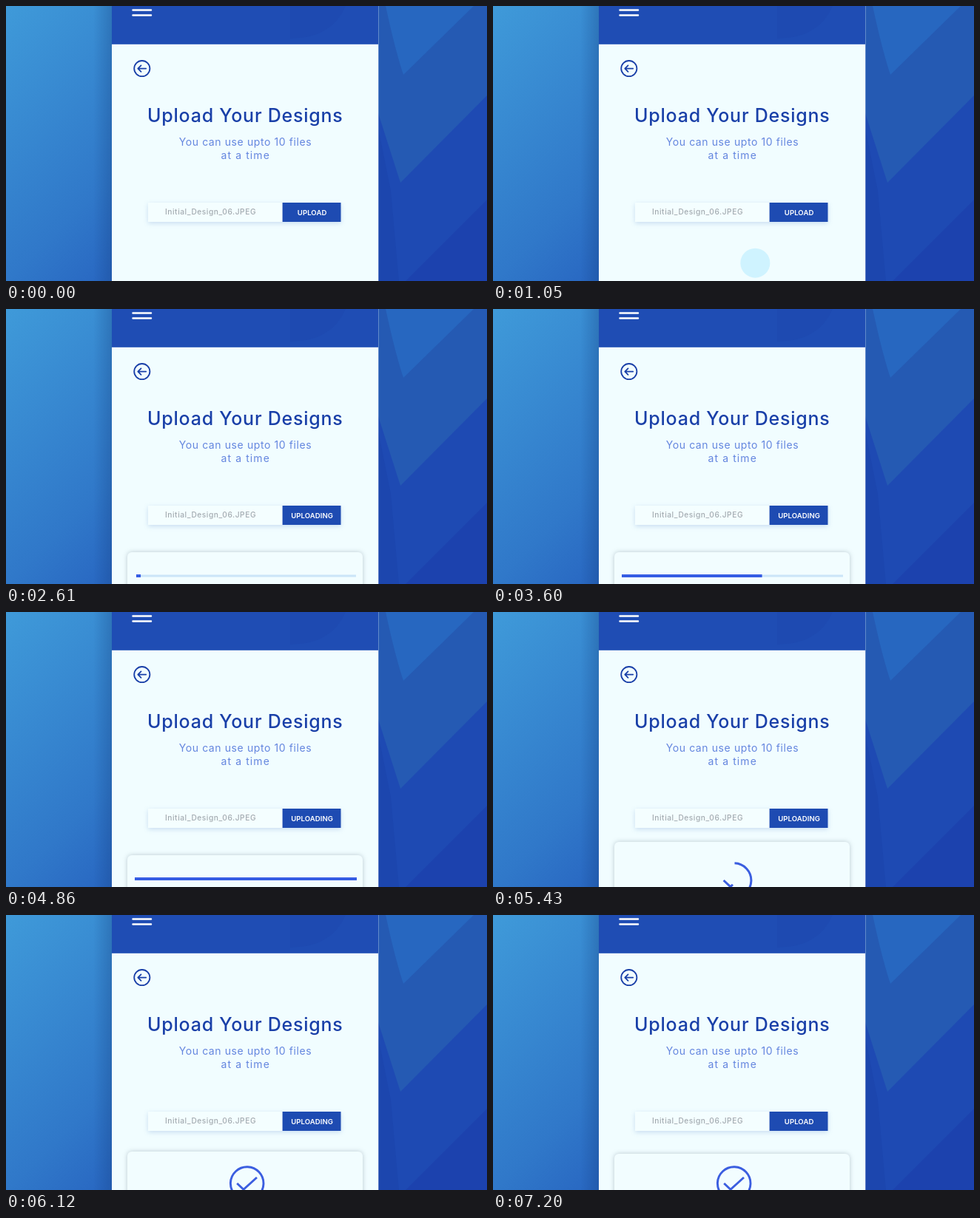
These frames come from a looping animation (650x372 px, 7.23 s). An HTML page:

```html
<!DOCTYPE html>
<html lang="en">
<head>
<meta charset="utf-8">
<title>Upload Your Designs</title>
<style>
  html, body { margin: 0; width: 650px; height: 372px; overflow: hidden; }
  svg { display: block; font-family: Inter, "Open Sans", sans-serif; }
  text { text-anchor: middle; }
  .title { font-size: 25px; font-weight: 500; letter-spacing: .75px; fill: #193fa8; }
  .sub { font-size: 14px; letter-spacing: .6px; fill: #6486df; }
  .sub.wide { letter-spacing: 1.1px; }
  .file { font-size: 10.2px; font-weight: 500; letter-spacing: .55px; fill: #a3aab0; text-anchor: start; }
  .label { font-size: 9.6px; font-weight: 600; letter-spacing: .05px; fill: #fff; }
  .field { filter: drop-shadow(0 2px 3px rgba(60, 110, 190, .22)); }
  #sheet { filter: drop-shadow(0 0 3px rgba(70, 90, 110, .32)); }
  .line { fill: none; stroke-linecap: round; stroke-linejoin: round; }
  #done { fill: none; stroke: #3b5ee0; stroke-width: 2.9; }
</style>
</head>
<body>
<svg width="650" height="372" viewBox="0 0 650 372">
  <defs>
    <linearGradient id="sky" gradientUnits="userSpaceOnUse" x1="0" y1="0" x2="250" y2="250">
      <stop offset="0" stop-color="#3f9ad9"/>
      <stop offset=".75" stop-color="#3078c9"/>
      <stop offset="1" stop-color="#2968c2"/>
    </linearGradient>
    <linearGradient id="shade">
      <stop offset="0" stop-color="#123a78" stop-opacity="0"/>
      <stop offset="1" stop-color="#123a78" stop-opacity=".28"/>
    </linearGradient>
  </defs>

  <!-- backdrop -->
  <rect width="143" height="372" fill="url(#sky)"/>
  <rect x="118" width="25" height="372" fill="url(#shade)"/>
  <rect x="503" width="147" height="372" fill="#1e4ab3"/>
  <path d="M503 0H650V121L533 239L503 145Z" fill="#255ab3"/>
  <path d="M513 0H632L537 93Q526 60 513 0Z" fill="#2767c0"/>
  <path d="M503 165L520 250L531 372H503Z" fill="#1c46ae"/>
  <path d="M650 262V372H540Z" fill="#1c42ae"/>

  <!-- screen -->
  <rect x="143" width="360.3" height="372" fill="#f1fdff"/>
  <rect x="143" width="360" height="51.8" fill="#1f4db4"/>
  <path d="M384 0V44Q440 44 459 0Z" fill="#1e4ab1"/>
  <path class="line" d="M171.5 5.4H196M171.5 12.5H196" stroke="#fff" stroke-width="2.5"/>
  <g class="line" stroke="#193fa8" stroke-width="1.8">
    <circle cx="183.8" cy="84.6" r="10.6"/>
    <path d="M189.2 84.6H178.5M182.5 80.4L178.3 84.6L182.5 88.8"/>
  </g>
  <text class="title" x="323.3" y="156.5">Upload Your Designs</text>
  <text class="sub" x="323.5" y="189">You can use upto 10 files</text>
  <text class="sub wide" x="323.7" y="207">at a time</text>

  <g class="field">
    <rect x="192" y="266" width="182" height="26" fill="#f4feff"/>
    <rect x="373.6" y="266" width="78.9" height="26" fill="#1e4bb2"/>
  </g>
  <text class="file" x="215" y="282.3">Initial_Design_06.JPEG</text>
  <text class="label" id="idle" x="413.6" y="282.6">UPLOAD</text>
  <text class="label" id="busy" x="413.6" y="282.6">UPLOADING</text>

  <!-- upload card -->
  <g id="card">
    <rect id="sheet" x="164" width="318" height="80" rx="6" fill="#f2fdff"/>
    <rect id="track" x="176" y="359.5" width="297" height="3" fill="#cbe5f8"/>
    <rect id="bar" y="359" height="4" fill="#365de4"/>
    <g id="done">
      <circle id="ring" r="22.3" pathLength="1" transform="rotate(-88)"/>
      <path id="tick" d="M-13.5 0L-4.7 8.3L13.3-8" pathLength="1"/>
    </g>
  </g>

  <circle id="touch" fill="rgb(177,234,255)"/>
</svg>
<script>
  const LOOP = 7230;
  const $ = id => document.getElementById(id);
  const set = (id, attrs) => {
    for (const name in attrs) $(id).setAttribute(name, attrs[name]);
  };
  const span = (t, from, to) => Math.min(1, Math.max(0, (t - from) / (to - from)));
  const smooth = p => p * p * (3 - 2 * p);
  const mix = (a, b, p) => a + (b - a) * p;

  function drawTouch(t) {
    const move = 1 - (1 - span(t, 800, 1560)) ** 1.43;
    const press = Math.sin(Math.PI * span(t, 1590, 1980));
    set('touch', {
      cx: mix(310.5, 411, move),
      cy: mix(400, 280, move),
      r: 20 - press,
      opacity: t < 800 ? 0 : .525 * (1 - span(t, 2160, 2340))
    });
  }

  function drawLabel(t) {
    const busy = span(t, 2160, 2340) - span(t, 6120, 6360);
    set('busy', { opacity: busy });
    set('idle', { opacity: 1 - busy });
  }

  function drawBar(t) {
    const shrink = smooth(span(t, 4860, 5160));
    const left = mix(176, 174, span(t, 2610, 2700));
    const right = mix(176, 474, span(t, 2578, 4203));
    set('bar', {
      x: mix(left, 325, shrink),
      width: (right - left) * (1 - shrink)
    });
    set('track', { opacity: t < 4860 ? 1 : 0 });
  }

  // Strokes the first part of a path whose length counts as 1.
  const trace = (id, part) =>
    set(id, { 'stroke-dasharray': `${part} 2`, opacity: part > 0 ? 1 : 0 });

  function drawCheck(t) {
    const scale = mix(1.04, 1, smooth(span(t, 5700, 6000)));
    set('done', { transform: `translate(325.7 363) scale(${scale})` });
    trace('ring', span(t, 5100, 5730));
    trace('tick', smooth(span(t, 5250, 5640)));
  }

  function draw(now) {
    const t = now % LOOP;
    const rise = smooth(span(t, 4860, 5400)), settle = smooth(span(t, 5700, 6330));
    set('card', { opacity: span(t, 2160, 2400) });
    set('sheet', { y: 329 - 18 * rise + 12 * settle });
    drawTouch(t);
    drawLabel(t);
    drawBar(t);
    drawCheck(t);
  }

  const start = performance.now();
  function loop() {
    draw(performance.now() - start);
    requestAnimationFrame(loop);
  }
  loop();
</script>
</body>
</html>
```
